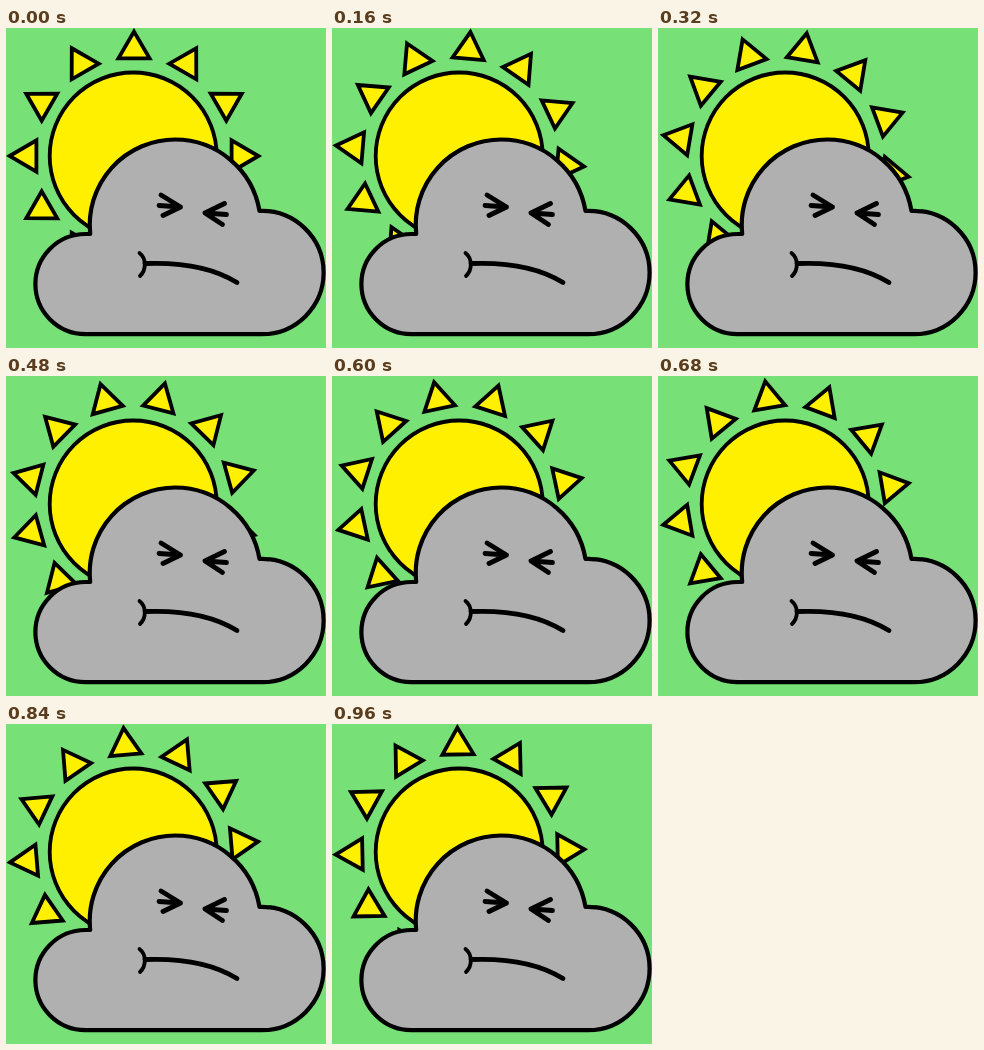
Recreate the animation shown at these times as an HTML page. Size 320x320 px, loop 1000 ms.

```html
<!DOCTYPE html>
<html lang="en">
<head>
<meta charset="utf-8">
<title>Sun behind a grumpy cloud</title>
<style>
  html, body { margin: 0; width: 100%; height: 100%; overflow: hidden; background: #77e077; }
  svg { display: block; width: 100%; height: 100%; }
</style>
</head>
<body>
<svg viewBox="0 0 320 320" stroke="#000" stroke-width="3.8">
  <rect width="320" height="320" fill="#77e077" stroke="none"/>
  <g fill="#fff000">
    <g id="rays"></g>
    <circle cx="127.2" cy="128" r="83.5"/>
  </g>
  <path fill="#b0b0b0" stroke-width="4.2" stroke-linejoin="round"
    d="M84.2 206 A85.5 85.5 0 0 1 169.2 111.5 A85.5 85.5 0 0 1 253.5 183
       A61.6 61.6 0 0 1 317.6 244.6 A61.6 61.6 0 0 1 256 306.2
       H79.5 A50.1 50.1 0 0 1 79.5 206 Z"/>
  <g fill="none" stroke-width="4.8" stroke-linecap="round" stroke-linejoin="round">
    <path d="M155 167 L174.500 179 L157 187.500 M153 177.500 L174.500 179"/>
    <path d="M218.500 175.500 L199 185 L216.500 196.500 M220.500 186.500 L199 185"/>
    <path d="M139 235.500 C177 234 207 239.500 231 254.500"/>
    <path stroke-width="3.8" d="M133.500 225 C140.500 230.500 140.500 242 134 248"/>
  </g>
</svg>
<script>
  const CENTER = "128 128", LOOP = 1000, STEP = 40, RAY_COUNT = 12;
  const GAP = 360 / RAY_COUNT;
  const rays = document.getElementById("rays");

  for (let i = 0; i < RAY_COUNT; i++) {
    const ray = document.createElementNS("http://www.w3.org/2000/svg", "path");
    ray.setAttribute("d", "M128 3.6 L143.6 30.4 H112.4 Z");
    ray.setAttribute("transform", `rotate(${i * GAP} ${CENTER})`);
    rays.append(ray);
  }

  // One loop turns the ring by the gap between two rays, in even steps.
  function draw(time) {
    const t = Math.floor((time % LOOP) / STEP) * STEP;
    rays.setAttribute("transform", `rotate(${GAP * t / LOOP} ${CENTER})`);
  }

  const start = performance.now();
  function tick() {
    draw(performance.now() - start);
    requestAnimationFrame(tick);
  }
  tick();
</script>
</body>
</html>
```
